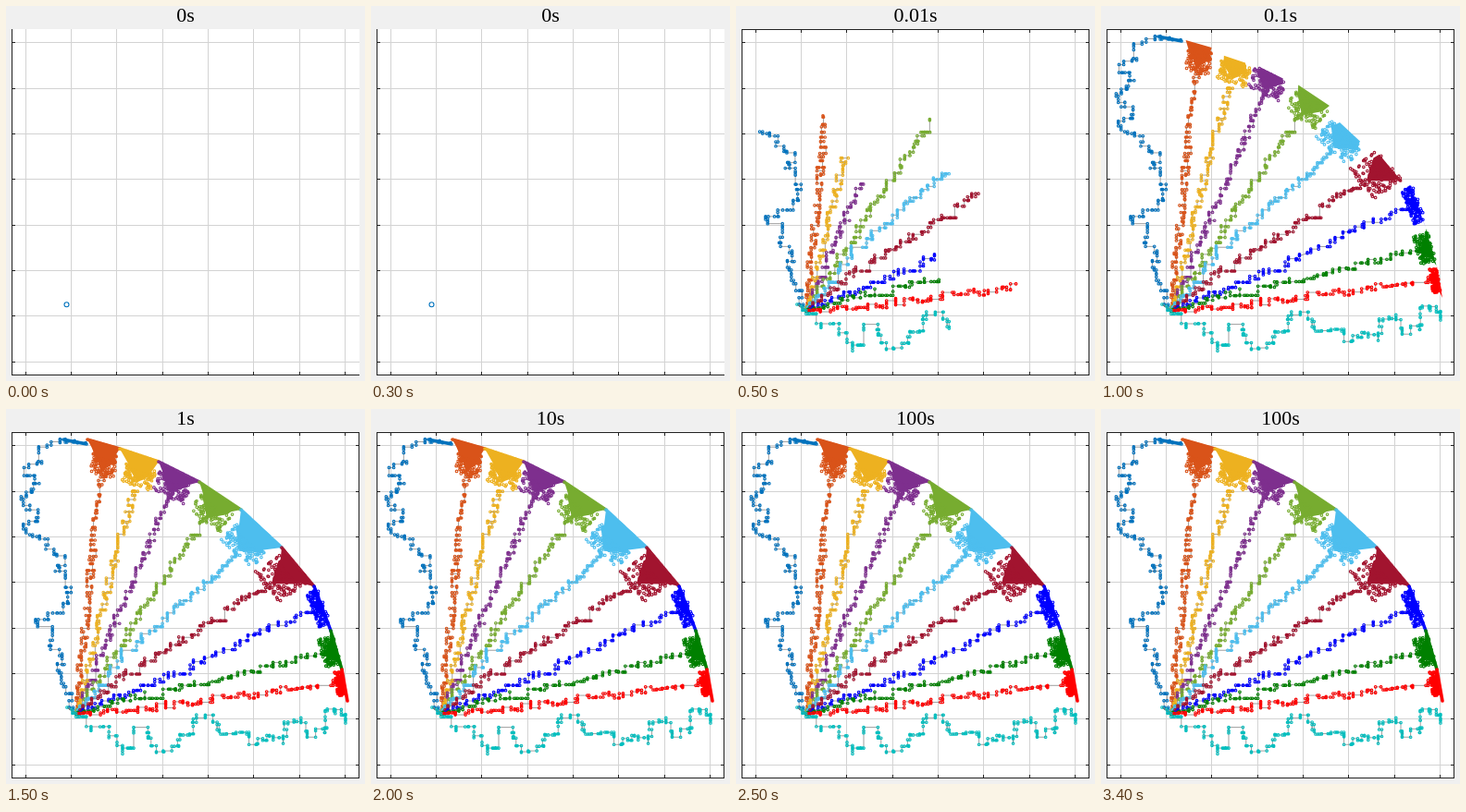
Recreate the animation shown at these times as an HTML page with a canvas. Size 388x406 px, loop 4000 ms.

```html
<!DOCTYPE html>
<html>
<head>
<meta charset="utf-8">
<style>
html, body { margin: 0; width: 100%; height: 100%; overflow: hidden; background: #f0f0f0; }
canvas { display: block; }
</style>
</head>
<body>
<canvas id="c" width="388" height="406"></canvas>
<script>
const ctx = document.getElementById('c').getContext('2d');
const titles = ['0s', '0.01s', '0.1s', '1s', '10s', '100s'];
const colors = ['#0072bd', '#d95319', '#edb120', '#7e2f8e', '#77ac30', '#4dbeee',
  '#a2142f', '#0000ff', '#008000', '#ff0000', '#00bfbf'];

let seed = 11;
const rnd = () => (seed = (seed * 16807) % 2147483647) / 2147483647;
const spread = s => (rnd() * 2 - 1) * s;
const mix = (a, b, k) => [a[0] + (b[0] - a[0]) * k, a[1] + (b[1] - a[1]) * k];

// Random walk along waypoints: every step moves in x or in y only.
function walk(way, step, sx, sy) {
  const out = [];
  let pos = way[0].slice(), run = 0;
  for (let i = 1; i < way.length; i++) {
    const len = Math.hypot(way[i][0] - way[i - 1][0], way[i][1] - way[i - 1][1]);
    for (let d = 0; d < len; d += step, run += step) {
      const t = mix(way[i - 1], way[i], d / len), grow = Math.min(1, 0.2 + run / 60);
      pos = rnd() < 0.5 ? [t[0] + spread(sx) * grow, pos[1]] : [pos[0], t[1] + spread(sy) * grow];
      out.push(pos);
    }
  }
  return out;
}

const pairs = s => s.split(' ').map(p => p.split(',').map(Number));

const leftA = pairs('75,329 68,320 71,308 65,300 57,294 55,284 60,275 57,265 48,256 46,244 25,233 44,225 61,214 70,207 67,195 61,185 54,174 62,160 47,153 42,139 22,134');
const leftB = pairs('22,134 20,127 35,118 22,106 12,98 28,88 33,78 20,66 38,56 40,42 60,34 87,37');
const lowA = pairs('72,328 80,336 95,346 105,343 120,357 128,370 135,349 153,346 155,366 165,371 185,365 188,352 200,350 203,336 222,331 232,352');
const lowB = pairs('232,352 248,350 265,352 270,362 285,352 301,358 303,340 322,338 326,352 345,350 347,330 363,325 366,340 365,320');

// Rim points shared by neighbouring fans.
const rim = pairs('88,33 123,43 165,57 209,79 254,109 298,150 333,192 351,240 363,282 369,316');
// bend, early end, fan centre
const arms = ['87,222 97,118 106,53', '100,237 118,162 145,67', '104,265 136,190 182,78',
  '140,230 212,122 226,105', '130,265 229,177 262,143', '130,287 263,203 305,177',
  '150,300 223,268 341,214', '121,317 223,295 354,262', '130,327 305,304 363,297'].map(pairs);
const inset = [.2, .45, .45, .25, .5, .4, 0, .05, 0];
const depth = [15, 13, 14, 16, 15, 22, 8, 10, 5];

function makeFan(i) {
  const [bend, early, c] = arms[i], a = rim[i], b = rim[i + 1], start = [76, 330];
  const dx = c[0] - start[0], dy = c[1] - start[1], len = Math.hypot(dx, dy);
  const u = [dx / len, dy / len], step = i > 5 ? 1.9 : 1.45;
  const sx = 1 + 3 * Math.abs(u[1]), sy = 1 + 3 * Math.abs(u[0]);
  const side = k => [c[0] + (b[0] - a[0]) * k, c[1] + (b[1] - a[1]) * k];
  const apex = [c[0] - u[0] * depth[i], c[1] - u[1] * depth[i]];
  const hull = [mix(a, c, inset[i]), mix(b, c, inset[i]), side(.3), apex, side(-.3)];
  const loose = [];
  for (let n = 0; n < 130; n++) {
    const p = side(spread(.38)), r = (rnd() * 1.7 - .4) * depth[i];
    loose.push([p[0] - u[0] * r, p[1] - u[1] * r]);
  }
  const edge = [];
  for (let n = 0; n <= 40; n++) edge.push(mix(a, b, n / 40));
  return {
    first: walk([start, bend, early], step, sx, sy),
    rest: walk([early, apex], step, sx, sy),
    hull, loose, edge, cap: [a, b, side(.25), side(-.25)]
  };
}

const series = [
  { first: walk(leftA, 2.5, 4, 2), rest: walk(leftB, 2.3, 4.5, 1.5) },
  ...arms.map((_, i) => makeFan(i)),
  { first: walk(lowA, 2.3, 2, 4), rest: walk(lowB, 2.2, 2, 4.5) }
];
series[0].rest.push(...Array.from({ length: 20 }, (_, i) => mix([62, 33], [87, 38], i / 19)));

function line(x1, y1, x2, y2, color) {
  ctx.strokeStyle = color;
  ctx.lineWidth = 1;
  ctx.beginPath();
  ctx.moveTo(x1, y1);
  ctx.lineTo(x2, y2);
  ctx.stroke();
}

function dots(pts, color, r = 1.3) {
  ctx.strokeStyle = color;
  ctx.lineWidth = 1.1;
  ctx.beginPath();
  for (const [x, y] of pts) {
    ctx.moveTo(x + r, y);
    ctx.arc(x, y, r, 0, 7);
  }
  ctx.stroke();
}

function trace(pts) {
  ctx.beginPath();
  pts.forEach(p => ctx.lineTo(...p));
}

function fill(pts, color) {
  trace(pts);
  ctx.fillStyle = color;
  ctx.fill();
}

function axes(boxed) {
  const xs = [], ys = [];
  for (let i = 0; i < 8; i++) {
    xs.push(Math.floor(21 + i * 49.35) + .5);
    ys.push(Math.floor(39.7 + i * 49.35) + .5);
  }
  ctx.fillStyle = '#f0f0f0';
  ctx.fillRect(0, 0, 388, 406);
  ctx.fillStyle = '#fff';
  ctx.fillRect(6, 25, 376, 375);
  xs.forEach(x => line(x, 25, x, 399, '#d3d3d3'));
  ys.forEach(y => line(6, y, 382, y, '#d3d3d3'));
  const ink = '#222';
  line(6.5, 25, 6.5, 400, ink);
  line(6, 399.5, 382, 399.5, ink);
  xs.forEach(x => line(x, 396, x, 400, ink));
  ys.forEach(y => line(6, y, 10, y, ink));
  if (!boxed) return;
  line(6, 25.5, 382, 25.5, ink);
  line(381.5, 25, 381.5, 400, ink);
  xs.forEach(x => line(x, 25, x, 29, ink));
  ys.forEach(y => line(378, y, 382, y, ink));
}

function draw(stage) {
  axes(stage > 0);
  ctx.fillStyle = '#000';
  ctx.font = '22px "Liberation Serif", serif';
  ctx.textAlign = 'center';
  ctx.fillText(titles[stage], 194, 17);
  if (!stage) return dots([[65.5, 323.3]], colors[0], 2.5);
  series.forEach((s, i) => {
    const pts = stage > 1 ? s.first.concat(s.rest) : s.first;
    trace([[66, 323], ...pts]);
    ctx.strokeStyle = '#777';
    ctx.lineWidth = .7;
    ctx.stroke();
    dots(pts, colors[i]);
    if (stage > 1 && s.hull) {
      fill(s.hull, colors[i]);
      dots(s.loose, colors[i]);
    }
    if (stage > 2 && s.cap) {
      fill(s.cap, colors[i]);
      dots(s.edge, colors[i]);
    }
  });
  dots([[66, 323], [71, 325], [74, 329]], colors[10]);
}

let shown = -1;
function tick() {
  const stage = Math.min(5, Math.floor(performance.now() % 4000 / 500));
  if (stage !== shown) draw(shown = stage);
  requestAnimationFrame(tick);
}
tick();
</script>
</body>
</html>
```
